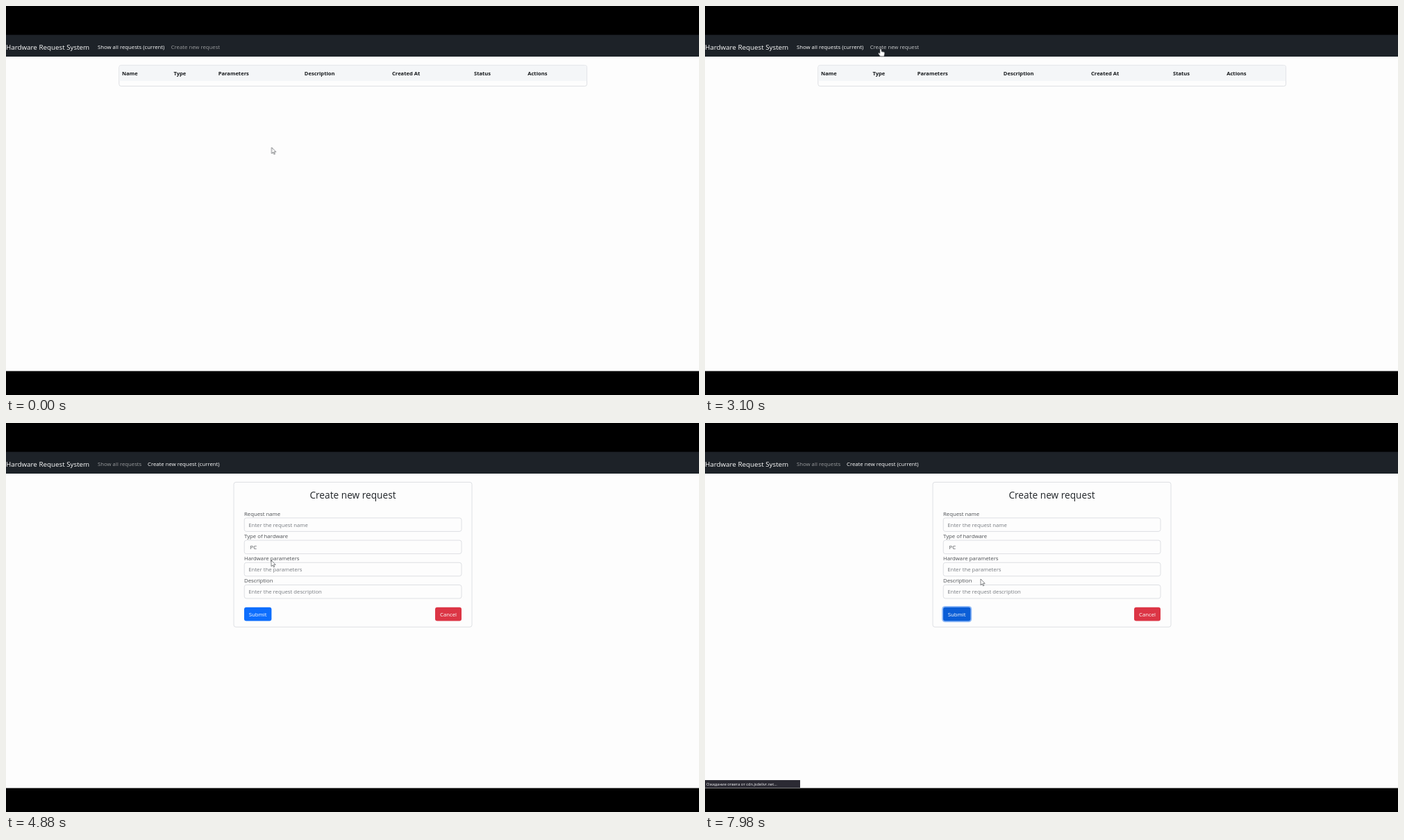
These frames come from a looping animation (998x561 px, 8000 ms). An HTML page:

```html
<!DOCTYPE html>
<html lang="en">
<head>
<meta charset="utf-8">
<title>Hardware Request System</title>
<style>
  html, body { margin: 0; width: 100%; height: 100%; overflow: hidden; background: #000; }
  svg { display: block; width: 998px; height: 561px; }
  text { font: 7.77px "Open Sans", "Noto Sans", sans-serif; fill: #4b4e52; }
  .brand { font-size: 9.8px; fill: #fff; }
  .title { font-size: 13.7px; fill: #212529; text-anchor: middle; }
  .link { fill: #9a9c9e; }
  .current, .button { fill: #fff; }
  .button { text-anchor: middle; }
  .head text { font-weight: 700; font-size: 7.6px; fill: #16191c; }
  .hint text { fill: #777b80; }
  .box { fill: #fdfdfd; stroke: #d6d9dd; stroke-width: .8; }
  .status text { font-size: 5.65px; fill: #f3f3f5; }

  .list, .form, .status, .arrow, .hand, .ring { animation: 8s step-end infinite; }
  .list { animation-name: list; }
  .form { animation-name: form; }
  .status { animation-name: status; }
  .arrow { animation-name: arrow; }
  .hand { animation-name: hand; }
  .ring { animation-name: ring; }
  .hover { animation: hover 8s linear infinite; }
  .submit { animation: submit 8s linear infinite; }
  .cursor { animation: move 8s ease-in-out infinite; }

  @keyframes list { 0% { visibility: visible } 47%, 100% { visibility: hidden } }
  @keyframes form { 0% { visibility: hidden } 47%, 100% { visibility: visible } }
  @keyframes status {
    0%, 47% { visibility: hidden }
    40.5%, 91.5%, 100% { visibility: visible }
  }
  @keyframes ring { 0% { visibility: hidden } 90.5%, 100% { visibility: visible } }
  @keyframes hover { 0%, 33.5% { fill: #9a9c9e } 35.4%, 100% { fill: #c5c7c9 } }
  @keyframes submit { 0%, 85.8% { fill: #0d6efd } 87.7%, 100% { fill: #0b5ed7 } }
  @keyframes arrow {
    0%, 54.2%, 93.2% { visibility: visible }
    33.5%, 85.2% { visibility: hidden }
  }
  @keyframes hand {
    0%, 54.2%, 93.2% { visibility: hidden }
    33.5%, 85.2% { visibility: visible }
  }
  @keyframes move {
    0%, 11% { transform: translate(382.5px, 204px) }
    19% { transform: translate(256px, 73px) }
    22%, 31.5% { transform: translate(255px, 71px) }
    35%, 42% { transform: translate(253px, 61.5px) }
    48.5%, 52.5% { transform: translate(264.5px, 63.8px) }
    61% { transform: translate(382px, 198px) }
    64%, 75% { transform: translate(384px, 200.5px) }
    85.7% { transform: translate(367px, 266.5px) }
    88%, 91.5% { transform: translate(366.5px, 270px) }
    99%, 100% { transform: translate(397px, 225px) }
  }
</style>
</head>
<body>
<svg viewBox="0 0 998 561">
  <rect y="73" width="998" height="453.5" fill="#fdfdfd"/>
  <rect y="41.6" width="998" height="31.4" fill="#1d2228"/>
  <text class="brand" x="0" y="62.8">Hardware Request System</text>

  <g class="list">
    <text class="current" x="132" y="61.8">Show all requests (current)</text>
    <text class="link hover" x="237.7" y="61.8">Create new request</text>
    <rect class="box" x="162.8" y="85.4" width="673.8" height="30.2" rx="3"/>
    <path d="M163.2 108V88.4q0-2.6 2.6-2.6h667.8q2.6 0 2.6 2.6V108z" fill="#f4f6f8"/>
    <g class="head">
      <text x="167" y="99.8">Name</text>
      <text x="241.5" y="99.8">Type</text>
      <text x="305.7" y="99.8">Parameters</text>
      <text x="429.8" y="99.8">Description</text>
      <text x="556" y="99.8">Created At</text>
      <text x="674" y="99.8">Status</text>
      <text x="751.2" y="99.8">Actions</text>
    </g>
  </g>

  <g class="form">
    <text class="link" x="132" y="61.8">Show all requests</text>
    <text class="current" x="204" y="61.8">Create new request (current)</text>
    <rect class="box" x="328" y="85.4" width="343" height="208.8" rx="3"/>
    <text class="title" x="499.5" y="108.5">Create new request</text>
    <g>
      <text x="343" y="133.6">Request name</text>
      <text x="343" y="165.8">Type of hardware</text>
      <text x="343" y="198">Hardware parameters</text>
      <text x="343" y="230.2">Description</text>
    </g>
    <g class="box">
      <rect x="343.2" y="136.9" width="312.8" height="19.5" rx="3"/>
      <rect x="343.2" y="169.1" width="312.8" height="19.5" rx="3"/>
      <rect x="343.2" y="201.3" width="312.8" height="19.5" rx="3"/>
      <rect x="343.2" y="233.5" width="312.8" height="19.5" rx="3"/>
    </g>
    <g class="hint">
      <text x="349.3" y="149.7">Enter the request name</text>
      <text x="349.3" y="214.1">Enter the parameters</text>
      <text x="349.3" y="246.3">Enter the request description</text>
    </g>
    <text x="351.5" y="181.9">PC</text>
    <rect class="ring" x="341.2" y="264" width="43" height="23.3" rx="4.5" fill="#8fb9f7"/>
    <rect class="submit" x="343" y="265.8" width="39.4" height="19.7" rx="3"/>
    <rect x="618" y="265.8" width="38" height="19.7" rx="3" fill="#dc3545"/>
    <text class="button" x="362.7" y="278.6">Submit</text>
    <text class="button" x="637" y="278.6">Cancel</text>
  </g>

  <g class="status">
    <rect y="515" width="137" height="11" fill="#2b2a33"/>
    <text x="2" y="522.8">Ожидание ответа от cdn.jsdelivr.net...</text>
  </g>

  <g class="cursor" stroke-linejoin="round">
    <path class="arrow" d="M0 0V8.8L2.1 6.9 3.5 10 4.8 9.4 3.5 6.4H6.2z"
      fill="#fff" stroke="#33363a" stroke-width=".6"/>
    <path class="hand" d="M-1.1 .9Q0-.5 1.1 .9V4L5 4.9Q6 5.2 5.8 6.4L4.9 11.2H-.5L-3.5 7.2Q-3.5 5.8-2.1 6.1L-1.1 6.9z"
      fill="#fff" stroke="#24272b" stroke-width=".5"/>
  </g>
</svg>
</body>
</html>
```
